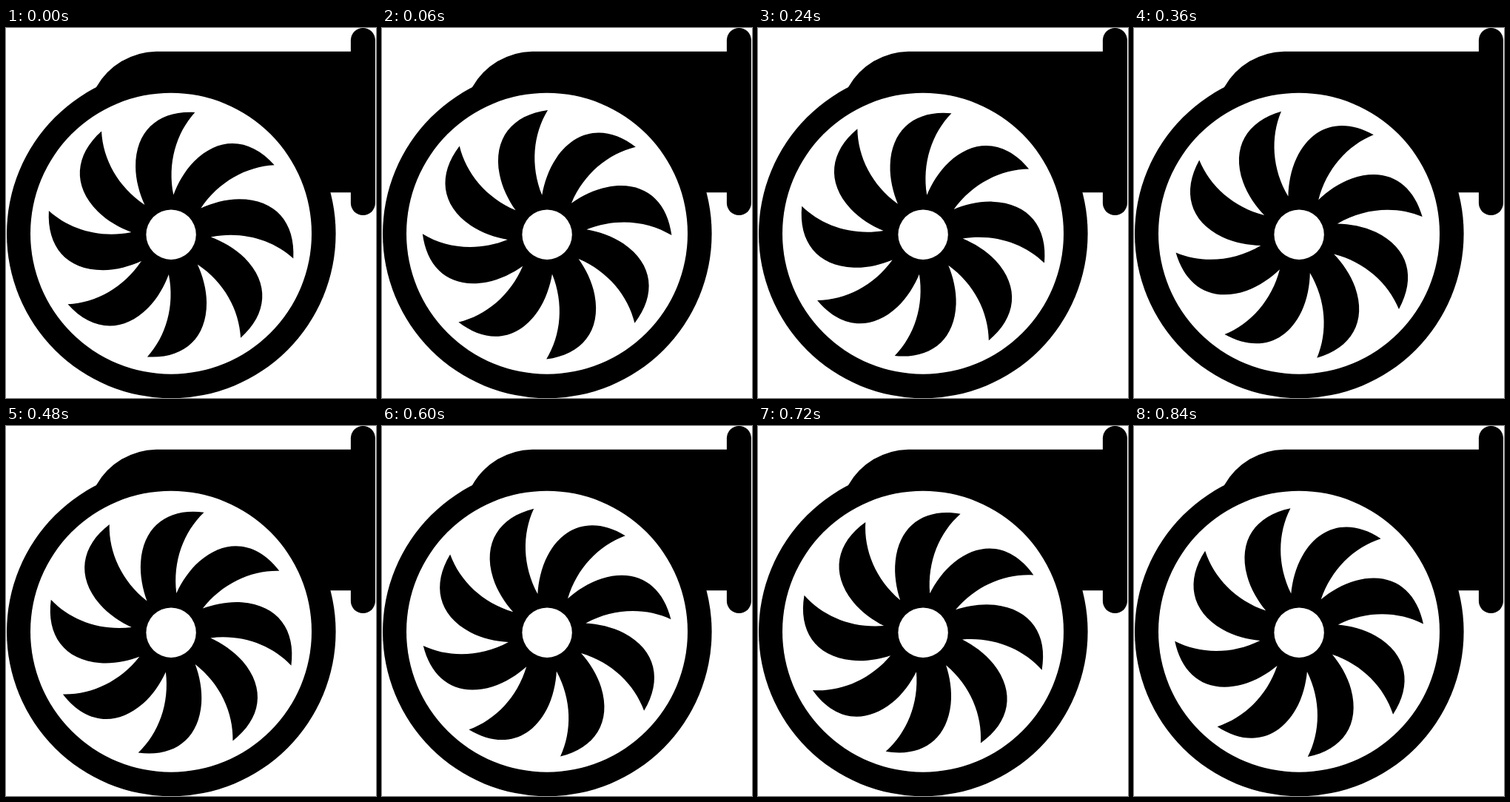
An HTML page for the animation above (0.87 s loop, 500 by 500 pixels).

```html
<!DOCTYPE html>
<html lang="en">
<head>
<meta charset="utf-8">
<title>Turbocharger</title>
<style>
  html, body { margin: 0; width: 100%; height: 100%; overflow: hidden; background: #fff; }
  svg { display: block; width: 100vw; height: 100vh; }
</style>
</head>
<body>
<svg viewBox="0 0 500 500">
  <path d="M122 80A95 95 0 0 1 203 31.7H480V222.3H223Z"/>
  <rect x="465.9" y="0" width="33.1" height="253" rx="16.5"/>
  <circle cx="223.3" cy="278" r="222.3"/>
  <circle cx="223" cy="277.7" r="190" fill="#fff"/>
  <g transform="translate(223.1 279.2)">
    <path id="wheel"/>
    <circle r="33.7" fill="#fff"/>
  </g>
</svg>
<script>
  const STEP_MS = 30, STEPS = 29, BLADES = 8;
  const TURN = 360 / 21; // degrees per step
  const wheel = document.getElementById('wheel');

  // One blade: convex edge up to the tip, concave edge back to the next notch.
  const blade = [
    [-42.5, -55], [-48, -74], [-48, -92],
    [-48, -141.5], [-16, -168], [32.2, -165.2],
    [6.7, -137], [-5.2, -96], [3.2, -53.7]
  ];

  function rotate([x, y], deg) {
    const a = deg * Math.PI / 180, c = Math.cos(a), s = Math.sin(a);
    return [x * c - y * s, x * s + y * c].map(v => v.toFixed(2)).join(' ');
  }

  function outline() {
    const pitch = 360 / BLADES;
    let d = 'M' + rotate(blade[8], -pitch);
    for (let i = 0; i < BLADES; i++) {
      d += 'C' + blade.map(p => rotate(p, i * pitch)).join(' ');
    }
    return d + 'Z';
  }

  function draw(ms) {
    const step = Math.floor(ms / STEP_MS) % STEPS;
    wheel.setAttribute('transform', `rotate(${(step * TURN).toFixed(3)})`);
  }

  wheel.setAttribute('d', outline());
  draw(0);
  const start = performance.now();
  (function tick() {
    draw(performance.now() - start);
    requestAnimationFrame(tick);
  })();
</script>
</body>
</html>
```
